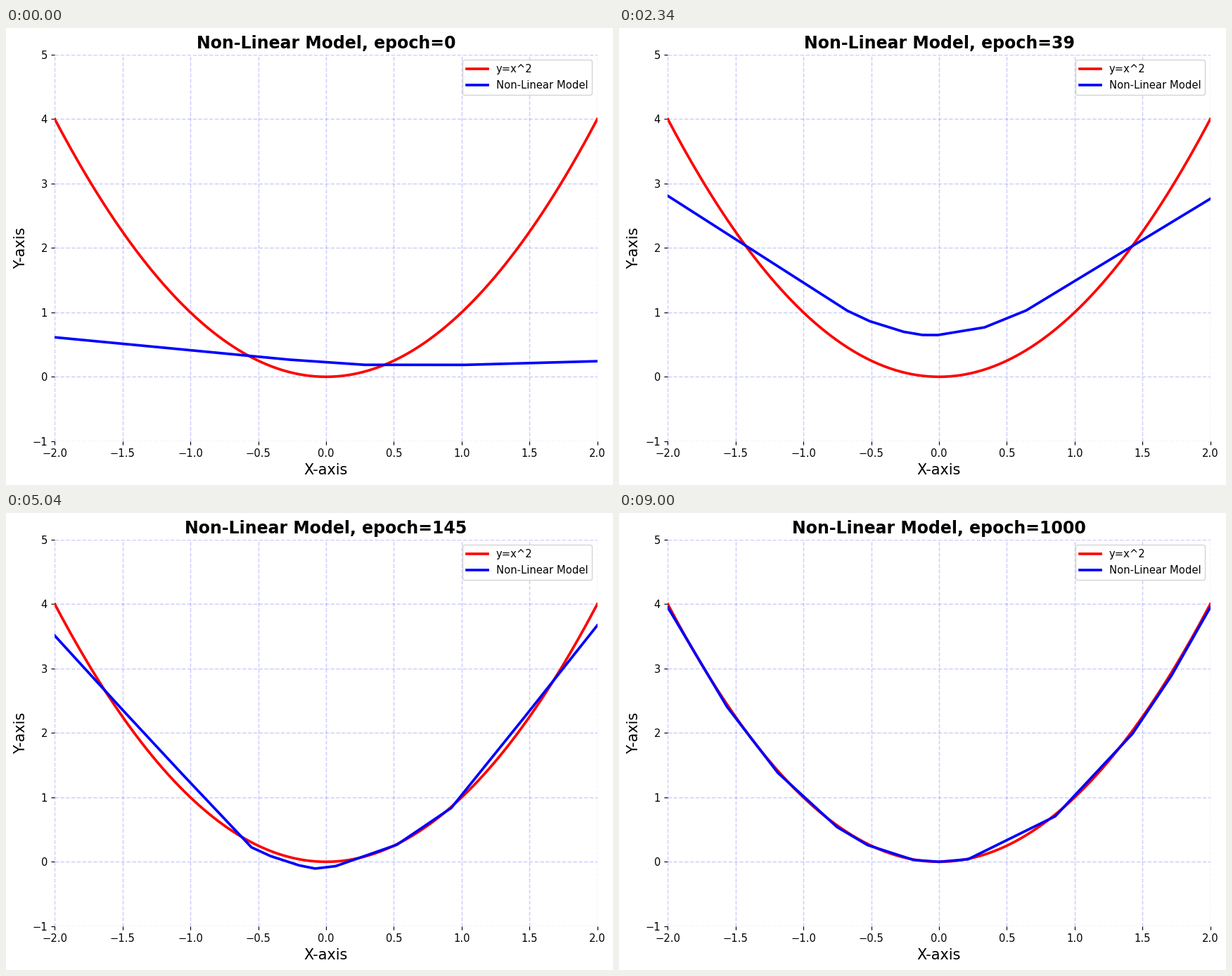
A matplotlib script that plays this animation: 863 by 649 pixels, repeating every 9060 ms.

```python
import numpy as np
import matplotlib.pyplot as plt
from matplotlib.animation import FuncAnimation

W, H, DPI = 863, 649, 106.5

# Epoch shown on each frame: the stride grows as training slows down
EPOCHS = np.r_[0:50, 50:100:2, 100:300:5, 300:1001:20]

# epoch: left end y, left bend, lowest point, right bend, right end y
POSES = {
    0: (.613, -.27, .266, .285, .186, 1.02, .185, .242),
    28: (2.4, -.794, 1.207, -.125, .882, .773, 1.297, 2.525),
    50: (3.07, -.545, .764, -.12, .355, .571, .714, 2.935),
    90: (3.4, -.39, .02, -.052, -.221, .591, .228, 3.52),
    145: (3.51, -.55, .225, -.08, -.105, .923, .835, 3.67),
    260: (3.7, -.742, .539, -.075, -.058, 1.183, 1.36, 3.825),
    1000: (3.95, -.752, .539, 0, 0, 1.427, 1.989, 3.95),
}


def pace(epoch):
    return np.log(np.asarray(epoch) + 20.0)


def slopes(t, v):
    """Monotone tangents: harmonic mean, zero at turning points."""
    d = np.diff(v, axis=0) / np.diff(t)[:, None]
    m = np.vstack([d[:1], np.zeros_like(d[1:]), d[-1:] / 2])
    a, b = d[:-1], d[1:]
    same = a * b > 0
    m[1:-1][same] = 2 * a[same] * b[same] / (a[same] + b[same])
    return m


T = pace(list(POSES))
V = np.array(list(POSES.values()))
M = slopes(T, V)


def pose(epoch):
    """Cubic blend of the two neighbouring poses."""
    at = pace(epoch)
    i = int(np.clip(np.searchsorted(T, at) - 1, 0, len(T) - 2))
    h = T[i + 1] - T[i]
    s = (at - T[i]) / h
    blend = V[i] + (V[i + 1] - V[i]) * s * s * (3 - 2 * s)
    return blend + h * s * (1 - s) * (M[i] * (1 - s) - M[i + 1] * s)


def sag(a, b, parts, amount):
    """Points from a towards b, hanging below the chord like a parabola."""
    f = np.array([0, *parts])
    x = a[0] + (b[0] - a[0]) * f
    y = a[1] + (b[1] - a[1]) * f + amount * (x - a[0]) * (x - b[0])
    return np.column_stack([x, y])


def fitted(epoch):
    left, ax_, ay, bx, by, cx, cy, right = pose(epoch)
    a, b, c, end = (ax_, ay), (bx, by), (cx, cy), (2, right)
    # The middle rounds off first, the arms only late in training
    arm = 1 / (1 + (320 / max(epoch, 1)) ** 4)
    inner = min(1, epoch / 40) * (.8 + .2 * arm)
    return np.vstack([
        sag((-2, left), a, (.35, .65), arm),
        sag(a, b, (.3, .75), inner),
        sag(b, c, (.15, .6), inner),
        sag(c, end, (.5,), arm),
        end,
    ]).T


plt.rcParams["font.family"] = "DejaVu Sans"
fig = plt.figure(figsize=((W + 1e-6) / DPI, (H + 1e-6) / DPI), dpi=DPI,
                 facecolor="white")
ax = fig.add_axes([69.4 / W, 1 - 586.8 / H, 771.2 / W, 548.8 / H])

x = np.linspace(-2, 2, 201)
ax.plot(x, x ** 2, color="red", lw=2.5, label="y=x^2")
model, = ax.plot([], [], color="blue", lw=2.5, label="Non-Linear Model")

ax.set_xlim(-2, 2)
ax.set_ylim(-1, 5)
ax.set_xticks(np.arange(-2, 2.1, .5))
ax.set_yticks(range(-1, 6))
ax.grid(color="blue", alpha=.2, ls="--", lw=1)
ax.spines[:].set_visible(False)
ax.set_xlabel("X-axis", fontsize=14)
ax.set_ylabel("Y-axis", fontsize=14)
title = ax.set_title("", fontsize=16, fontweight="bold")
ax.legend(loc="upper right", fontsize=10)


def update(frame):
    epoch = int(EPOCHS[frame])
    model.set_data(*fitted(epoch))
    title.set_text(f"Non-Linear Model, epoch={epoch}")
    return model, title


anim = FuncAnimation(fig, update, frames=len(EPOCHS), interval=60,
                     repeat=True, repeat_delay=0, blit=False)
plt.show()
```
